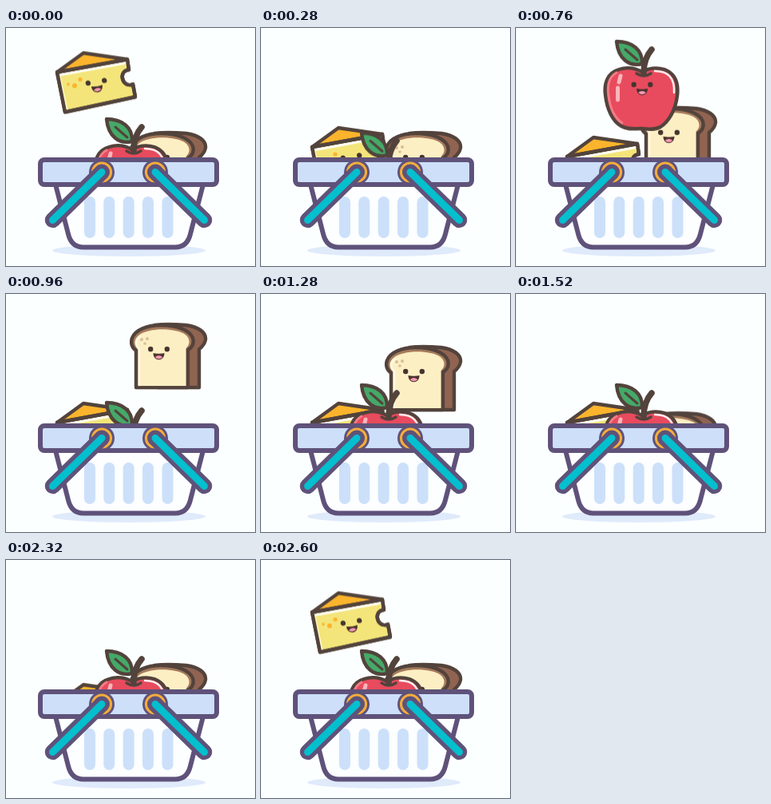
Animation, 312 px wide and 298 px high, one loop 2.64 s. Source, as an HTML page:

```html
<!DOCTYPE html>
<html lang="en">
<head>
<meta charset="utf-8">
<title>Grocery basket</title>
<style>
  html, body { margin: 0; width: 100%; height: 100%; overflow: hidden; background: #fcffff; }
  svg { display: block; width: 100vw; height: 100vh; }

  .food { stroke: #52433c; stroke-width: 4.4; stroke-linejoin: round; stroke-linecap: round; }
  .flat { stroke: none; }
  .line { fill: none; }
  .basket { stroke: #5f527a; stroke-width: 6; stroke-linejoin: round; stroke-linecap: round; }

  .hop { animation: 2640ms infinite cubic-bezier(.333, .667, .667, 1); }
  .cheese { animation-name: cheese; animation-delay: -480ms; }
  .apple { animation-name: apple; animation-delay: -2480ms; }
  .bread { animation-name: bread; animation-delay: -2065ms; }

  /* crouch, leap, drop past the rest line, settle */
  @keyframes cheese {
    0% { transform: translateY(0); }
    10.3% { transform: translateY(23px); }
    19.7% { transform: translateY(-109px); animation-timing-function: cubic-bezier(.333, 0, .667, .333); }
    30.3% { transform: translateY(22px); animation-timing-function: ease-in-out; }
    47%, 100% { transform: translateY(0); }
  }
  @keyframes apple {
    0% { transform: translateY(0); }
    9.73% { transform: translateY(24px); }
    19.7% { transform: translateY(-108px); animation-timing-function: cubic-bezier(.333, 0, .667, .333); }
    30.3% { transform: translateY(22px); animation-timing-function: ease-in-out; }
    42.8%, 100% { transform: translateY(0); }
  }
  @keyframes bread {
    0% { transform: translateY(0); }
    3.37% { transform: translateY(16px); }
    20.64% { transform: translateY(-108px); animation-timing-function: cubic-bezier(.333, 0, .667, .333); }
    31.25% { transform: translateY(22px); animation-timing-function: ease-in-out; }
    47.16%, 100% { transform: translateY(0); }
  }
</style>
</head>
<body>
<svg viewBox="0 0 312 298" preserveAspectRatio="none">
  <defs>
    <clipPath id="above"><path d="M0 0H312V180H0Z"/></clipPath>
    <g id="face" stroke="none">
      <circle cx="-10.300" cy="-3" r="3.200" fill="#45352f"/>
      <circle cx="10.300" cy="-3" r="3.200" fill="#45352f"/>
      <path d="M-7 2Q0 3.500 7 2C7 13-7 13-7 2Z" fill="#4b3230"/>
      <path d="M-4.800 7Q0 3 4.800 7Q0 11.400-4.800 7Z" fill="#f59ab0"/>
    </g>
    <g id="arm" class="basket">
      <circle r="16" fill="#5f527a" stroke="none"/>
      <circle r="11.500" fill="#5f527a" stroke="#f3ac3c" stroke-width="3.200"/>
      <path d="M0 0L-61.500 60" stroke-width="19.500"/>
      <path d="M0 0L-61.500 60" stroke="#04bfce" stroke-width="9"/>
    </g>
  </defs>

  <rect width="312" height="298" fill="#fcffff"/>
  <ellipse cx="154" cy="278.500" rx="96" ry="7.500" fill="#dfeafb"/>

  <g clip-path="url(#above)">
    <g class="hop cheese">
      <g class="food" transform="translate(0 108)">
        <path d="M64 53L152 37L154 50C146 51 144 58 147 64C150 69 155 70 159 68L162 84L74 103Z" fill="#f3e57a"/>
        <path d="M67 56.500L149 41.500" class="line" stroke="#fffdf0" stroke-width="3.500"/>
        <path d="M67 57L76 99" class="line" stroke="#fff9cf" stroke-width="2.500"/>
        <path d="M64 53L97 29L152 37Z" fill="#fbb42c"/>
        <path d="M64 53L152 37L154 50C146 51 144 58 147 64C150 69 155 70 159 68L162 84L74 103Z" class="line"/>
        <g class="flat" fill="#fbb42c">
          <circle cx="78" cy="68" r="1.800"/>
          <circle cx="86" cy="70" r="3"/>
          <circle cx="93" cy="62" r="2.600"/>
        </g>
        <use href="#face" transform="translate(113.500 68) rotate(-9)"/>
      </g>
    </g>

    <g class="hop bread">
      <g class="food" transform="translate(0 92)">
        <path d="M186 40C200 38 214 39 226 40C241 42 251 49 250 58C249 64 246 67 242 70V118H190Z" fill="#906451"/>
        <path d="M163 118V72C158 68 156 62 158 56C162 46 176 40 194 40C214 40 230 46 234 56C236 63 233 68 228 71V118Z" fill="#a57a5c"/>
        <path d="M165.500 116V70C160 65 160 58 166 53C178 43 212 43 225 52C232 58 230 65 225.500 69V116Z" class="flat" fill="#fdefc4"/>
        <path d="M167 115V70C162 65 162 59 168 54.500" class="line" stroke="#fffae6" stroke-width="2.500"/>
        <g class="flat" fill="#d8bf96">
          <circle cx="170" cy="58" r="2"/>
          <circle cx="177" cy="57" r="2"/>
          <circle cx="174" cy="63" r="1.800"/>
        </g>
        <use href="#face" transform="translate(191.500 73)"/>
      </g>
    </g>

    <g class="hop apple">
      <g class="food" transform="translate(0 96)">
        <path d="M158 56C149 51 138 50 129 53C115 57 110 70 112 85C114 103 121 118 132 124C141 129 149 127 157 127C165 127 172 130 181 125C192 118 200 103 202 86C204 70 199 58 186 53C176 50 167 51 158 56Z" fill="#e84b5d"/>
        <path d="M126 57C117 62 114 73 116 86C118 102 124 114 133 120" class="line" stroke="#f47c86" stroke-width="3"/>
        <path d="M131 61L129 69M127.500 76V91" class="line" stroke="#fbb5bb" stroke-width="5"/>
        <path d="M174 55C191 55 199 64 198 82" class="line" stroke="#fff0f0" stroke-width="2.500"/>
        <path d="M151 58Q160 64 169 58" class="line" stroke-width="3.500"/>
        <path d="M160 57C160 45 163 36 170 28" class="line" stroke-width="7.500"/>
        <path d="M126 18C145 18 159 28 158 46C142 50 128 40 126 18Z" fill="#45a968"/>
        <path d="M137 28L152 41" class="line" stroke-width="3"/>
        <use href="#face" transform="translate(158 75)"/>
      </g>
    </g>
  </g>

  <g class="basket">
    <path d="M61 192L78 258Q82 274.500 97 274.500H212Q227 274.500 231 258L248 192Z" fill="#fcfeff"/>
    <path d="M105 218V256M129.300 218V256M153.700 218V256M178 218V256M202.500 218V256" stroke="#cce0fa" stroke-width="14"/>
    <rect x="43" y="165" width="221" height="31" rx="5" fill="#cddff9"/>
  </g>
  <use href="#arm" transform="translate(120 180.500)"/>
  <use href="#arm" transform="translate(187 180.500) scale(-1 1)"/>
</svg>
</body>
</html>
```
